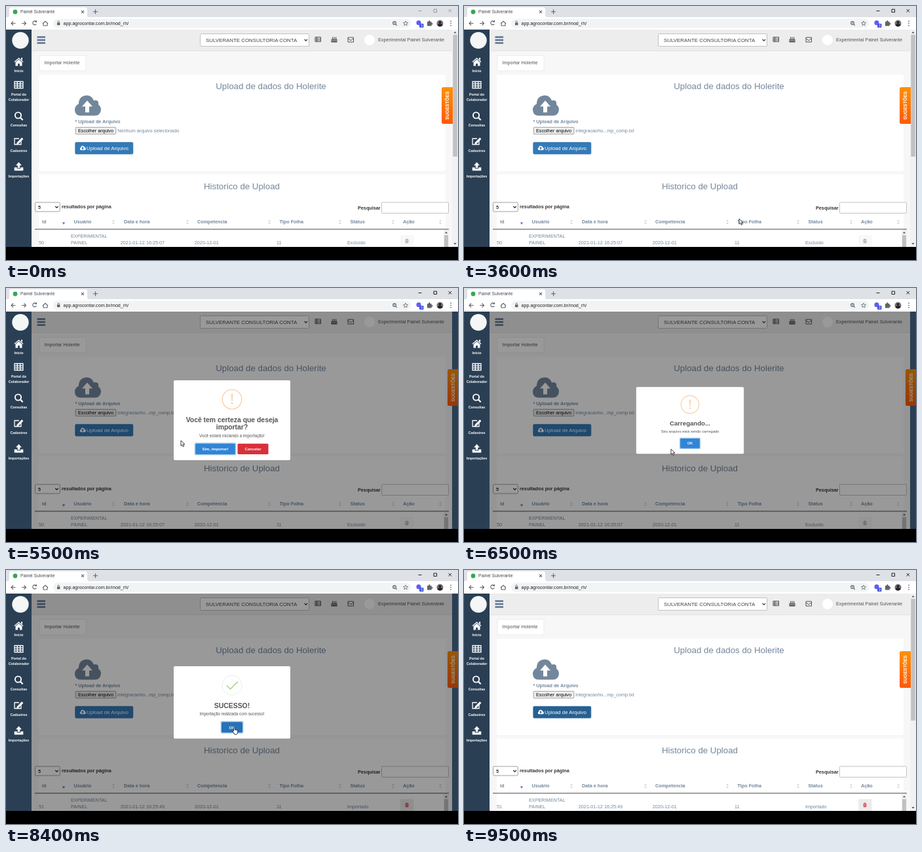
An HTML page for the animation above (9.6 s loop, 690 px wide and 388 px high).

```html
<!DOCTYPE html>
<html lang="pt-BR">
<head>
<meta charset="utf-8">
<style>
html, body { margin: 0; width: 100%; height: 100%; overflow: hidden; background: #000 }
svg { display: block; width: 690px; height: 388px }
text { font: 7.25px "Liberation Sans", Arial, sans-serif; fill: #73879c; white-space: pre }
.b { font-weight: bold }
.k { fill: #333 }
.w { fill: #fff }
.c { text-anchor: middle }
.h { font-size: 13.3px; text-anchor: middle }
.nav { font-size: 5.3px; font-weight: bold; fill: #fff; text-anchor: middle }
.title { font-size: 10.4px; font-weight: bold; fill: #545454; text-anchor: middle }
.sub { font-size: 6.3px; fill: #545454; text-anchor: middle }
.btn { font-size: 5.9px; font-weight: bold; fill: #fff; text-anchor: middle }
.line { fill: none; stroke: #5f6368; stroke-width: 1.1 }
.box { fill: #fff; stroke: #8a8a8a; stroke-width: .8 }
.field { fill: #fff; stroke: #b4b4b4; stroke-width: .8 }
</style>
</head>
<body>
<svg viewBox="0 0 690 388">
<defs>
  <linearGradient id="orange" x2="0" y2="1"><stop stop-color="#ff9100"/><stop offset="1" stop-color="#ff5a00"/></linearGradient>
  <g id="cloud">
    <path d="M9 31Q0 31 0 22Q0 16 6 13Q6 1 18 0Q26 0 29 8Q37 6 36 14Q40 17 40 22Q39 31 31 31Z"/>
    <path fill="#fff" d="M19 8L27 17H22V26H16V17H11Z"/>
  </g>
  <g id="trash" fill="none" stroke-width=".9">
    <path d="M609.5 357.2h5M611 357v-1h2v1M610.1 357.5v4.3h3.8v-4.3M611.4 358.5v2.5M612.6 358.5v2.5"/>
  </g>
  <g id="ok">
    <rect x="327.5" y="230.8" width="35" height="19" rx="2" fill="#a9cbed"/>
    <rect x="329" y="232.3" width="32" height="16" rx="1.5"/>
    <text class="btn" x="345" y="242.5">OK</text>
  </g>
  <g id="alert">
    <circle cx="345" cy="0" r="14.8" fill="none" stroke="#facea8" stroke-width="1.3"/>
    <path d="M344.2 -8h1.7l-.4 11h-.9zM344.2 5h1.7v2h-1.7z" fill="#f8bb86"/>
  </g>
</defs>

<!-- Browser -->
<rect width="690" height="18" fill="#dee1e6"/>
<path d="M2 18Q5 17 5 13V5Q5 2 8 2H121Q124 2 124 5V13Q124 17 127 18Z" fill="#fff"/>
<circle cx="14" cy="9" r="3.4" fill="#34a853"/>
<text x="22" y="11.3" style="font-size:6.7px;fill:#45494d">Painel Sulverante</text>
<path class="line" d="M115 6.8l4 4m0-4l-4 4M133 8.7h7M136.5 5.2v7"/>
<path id="win" fill="none" d="M629.5 7.5h5M653 5h4.5v4.5H653zM675.5 5l4.5 4.5m0-4.5l-4.5 4.5"/>
<rect y="17" width="690" height="19" fill="#fff"/>
<path class="line" d="M14.5 26.5H8m3-3l-3 3 3 3M46 23.8a3 3 0 1 0 .4 3.6M46.5 22v2.3h-2.3M56 27l4-3.7 4 3.7M57 26.5v3.5h6v-3.5"/>
<path class="line" d="M24 26.5h6.5m-3-3l3 3-3 3"/>
<rect x="72" y="19.5" width="546" height="14" rx="7" fill="#f1f3f4"/>
<rect x="78" y="25.5" width="4.4" height="3.7" fill="#5f6368"/>
<path class="line" style="stroke-width:.8" d="M79 25.5v-1.3a1.2 1.2 0 0 1 2.4 0v1.3"/>
<text x="87.5" y="29" style="font-size:7.15px;fill:#202124">app.agrocontar.com.br/mod_rh/</text>
<circle class="line" cx="593" cy="26" r="2.4"/><path class="line" d="M594.8 27.8l2 2M592 26h2"/>
<path class="line" style="stroke-width:.8" d="M610 23l1 2.3 2.5.2-1.9 1.6.6 2.5-2.2-1.3-2.2 1.3.6-2.5-1.9-1.6 2.5-.2z"/>
<circle cx="630" cy="25.7" r="3.6" fill="#625df5"/>
<rect x="631" y="27" width="6.5" height="6" rx="1" fill="#4257d8"/><text class="w c" x="634.3" y="32" style="font-size:5px">3</text>
<path fill="#5f6368" d="M643 24h2q0-2 1.3-2t1.3 2h2v2q2 0 2 1.3t-2 1.3v1.9h-6.6z"/>
<circle cx="662.5" cy="26.5" r="5" fill="#7d6f72"/>
<path d="M658.5 29.5Q659 27 662.5 27T666.5 29.5Q665 31.5 662.5 31.5T658.5 29.5" fill="#24242c"/><circle cx="662.5" cy="25" r="2" fill="#24242c"/>
<path fill="#5f6368" d="M678.3 22.5h1.5v1.5h-1.5zM678.3 25.8h1.5v1.5h-1.5zM678.3 29h1.5v1.5h-1.5z"/>

<!-- Page -->
<rect y="36" width="690" height="332" fill="#2a3f54"/>
<rect x="39" y="36" width="642" height="332" fill="#f7f7f7"/>
<rect x="39" y="36" width="642" height="32" fill="#ededed"/>
<path d="M39 68.4h642" stroke="#d9dee4" stroke-width=".8"/>
<path d="M47.5 47.5h12.5M47.5 52h12.5M47.5 56.5h12.5" stroke="#5a738e" stroke-width="2.3"/>
<rect class="field" x="296.5" y="42.5" width="166" height="19" rx="1"/>
<text x="305" y="54.7" style="font-size:7.9px;fill:#444">SULVERANTE CONSULTORIA CONTA</text>
<path d="M455.5 50.8l2.3 2.3 2.3-2.3" fill="none" stroke="#333" stroke-width="1.2"/>
<path d="M472 47.5h8.5v7H472zM472 50h8.5M472 52.3h8.5M474.5 47.5v7" fill="none" stroke="#515356" stroke-width="1"/>
<path d="M496.5 55.5v-4.8h9v4.8zM498 50.5v-3h1.2v3zM500.5 50.5v-3h1.2v3zM503 50.5v-3h1.2v3z" fill="#515356"/>
<path d="M497 52.5q1 1.3 2 0 1 1.3 2 0 1 1.3 2 0 1 1.3 2 0" fill="none" stroke="#ededed" stroke-width=".7"/>
<path d="M522 48h8.5v7H522zM522 49.7l4.2 3 4.2-3" fill="none" stroke="#515356"/>
<circle cx="555" cy="52" r="8" fill="#fff"/>
<text x="568" y="54.3" style="fill:#515356">Experimental Painel Sulverante</text>

<path d="M51 99V75.5h71V99z" fill="#fff" stroke="#e6e9ed" stroke-width=".8"/>
<text x="58.5" y="89.3" style="fill:#555">Importar Holerite</text>
<path d="M50 105h621v147H50zM50 257.5h621V368H50z" fill="#fff"/>
<text class="h" x="404.5" y="127">Upload de dados do Holerite</text>
<use href="#cloud" fill="#73879c" transform="translate(105 136.5)"/>
<text class="b" x="105.5" y="178.8">* Upload de Arquivo</text>
<rect id="pick" class="box" x="106.2" y="185.3" width="61.6" height="10.4" rx="1"/>
<text x="110" y="193" style="fill:#000">Escolher arquivo</text>
<text id="file" x="170.3" y="193"></text>
<rect id="send" x="105.8" y="208.3" width="88" height="17.8" rx="1.5" stroke="#2e6da4" stroke-width=".8"/>
<path fill="#fff" d="M115 220.3q-2.2 0-2.2-2 0-1.4 1.4-2 .1-2.8 2.8-2.9 1.9 0 2.5 1.8 1.7-.1 1.6 1.6.8.5.8 1.5 0 2-2 2z"/>
<path fill="#337ab7" d="M117 215l2 2.2h-1.2v2h-1.6v-2H115z"/>
<text class="w" x="123" y="220" style="font-size:7.8px">Upload de Arquivo</text>

<text class="h" x="360" y="280">Historico de Upload</text>
<rect class="box" x="44.5" y="300" width="37.8" height="14" rx="1.5"/>
<text class="b k" x="49" y="309.5">5</text>
<path d="M75.3 306l2.2 2.2 2.2-2.2" fill="none" stroke="#222" stroke-width="1.2"/>
<text class="b k" x="85" y="309.3">resultados por página</text>
<text class="b k" x="537" y="310.8">Pesquisar</text>
<rect class="field" x="573.5" y="300" width="102" height="16.5" rx="1"/>
<path d="M44 341h632" stroke="#333" stroke-width=".9"/>
<g id="heads"></g>
<text id="rowId" x="50" y="363.7"></text>
<text x="99" y="353.8">EXPERIMENTAL</text><text x="99" y="363.7">PAINEL</text>
<text id="rowTime" x="174.8" y="363.7"></text>
<text x="287.8" y="363.7">2020-12-01</text><text x="413" y="363.7">11</text>
<text id="rowState" x="521" y="363.7"></text>
<rect id="del" x="602" y="350" width="20.5" height="18" rx="1.5"/>
<use id="bin" href="#trash"/>
<rect x="668" y="342" width="8" height="26" fill="#f1f1f1"/>
<path d="M669.8 347.3l2.2-2.6 2.2 2.6z" fill="#555"/><rect x="669" y="350" width="6" height="18" fill="#c1c1c1"/>

<g id="bar">
  <rect x="681" y="36" width="9" height="332" fill="#f1f1f1"/>
  <rect x="682.3" y="44" width="6.6" height="186" fill="#c1c1c1"/>
  <path d="M683.3 41.5l2.2-2.6 2.2 2.6zM683.3 362l2.2 2.6 2.2-2.6z" fill="#555"/>
</g>
<g id="tips">
  <path d="M682 124h-14.5q-2.5 0-2.5 2.5v51q0 2.5 2.5 2.5H682z" fill="url(#orange)"/>
  <text class="b w c" transform="translate(676 152) rotate(-90)" style="font-size:7px">SUGESTÕES</text>
</g>
<path id="shade" d="M39 36h642v88h9v56h-9v188H39z"/>

<!-- Sidebar -->
<circle cx="22" cy="52.5" r="12.7" fill="#f4f7f5"/>
<g fill="#fff">
  <path d="M19.5 79l7 6-.8 1-6.2-5.3-6.2 5.3-.8-1zM14.5 86l5-4.3 5 4.3v5.5h-3.6v-3.6h-2.8v3.6h-3.6zM23 79h2v4l-2-1.8z"/>
  <path d="M16 211.5l1-3.2 7.2-7.2 2.2 2.2-7.2 7.2z"/>
  <path d="M19.5 238.5l4.5 5h-2.8v4h-3.4v-4H15zM12.7 246.5h4v2h5.6v-2h4v5H12.7z"/>
</g>
<path d="M13 115.5h13v10H13zM13 118.8h13M13 122.2h13M17.3 115.5v10M21.7 115.5v10M23 205v6.5H13v-9h7" fill="none" stroke="#fff" stroke-width="1.3"/>
<circle cx="18.5" cy="167" r="4.6" fill="none" stroke="#fff" stroke-width="1.9"/><path d="M22 170.5l3.6 3.8" stroke="#fff" stroke-width="2.3"/>
<text class="nav" x="19.5" y="101">Início</text>
<text class="nav" x="19.5" y="136.8">Portal do</text><text class="nav" x="19.5" y="144.8">Colaborador</text>
<text class="nav" x="19.5" y="183.8">Consultas</text>
<text class="nav" x="19.5" y="222.6">Cadastros</text>
<text class="nav" x="19.5" y="261.8">Importações</text>

<!-- Dialogs -->
<g id="ask">
  <rect x="256" y="141" width="178" height="122" rx="2" fill="#fff"/>
  <use href="#alert" y="170"/>
  <text class="title" x="345" y="205">Você tem certeza que deseja</text><text class="title" x="345" y="216.3">importar?</text>
  <text class="sub" x="345" y="227.8">Você estará iniciando a importação!</text>
  <rect x="287.7" y="236.3" width="63.6" height="19.2" rx="2" fill="#a9cbed"/>
  <rect x="289.2" y="237.8" width="60.6" height="16.2" rx="1.5" fill="#3085d6"/>
  <rect x="353.5" y="237.8" width="47" height="16.2" rx="1.5" fill="#d9303a"/>
  <text class="btn" x="319.5" y="248">Sim, importar!</text><text class="btn" x="377" y="248">Cancelar</text>
</g>
<g id="load">
  <rect x="256" y="147" width="178" height="110.5" rx="2" fill="#fff"/>
  <use href="#alert" y="176"/>
  <text class="title" x="345" y="210.6">Carregando...</text>
  <text class="sub" x="345" y="222.3">Seu arquivo está sendo carregado</text>
  <use href="#ok" fill="#3085d6"/>
</g>
<g id="done">
  <rect x="256" y="147" width="178" height="110.5" rx="2" fill="#fff"/>
  <circle cx="345" cy="176" r="15" fill="none" stroke="#edf7e8" stroke-width="1.4"/>
  <path id="tick" d="M337 176.5l5.5 5.3 11.5-11.3" pathLength="1" stroke-dasharray="1 2" fill="none" stroke="#a5dc86" stroke-width="1.7"/>
  <text class="title" x="345" y="210.6">SUCESSO!</text>
  <text class="sub" x="345" y="222.3">Importação realizada com sucesso!</text>
  <use id="okDone" href="#ok"/>
</g>

<g id="mouse" stroke="#111" stroke-width=".8" fill="#fff" stroke-linejoin="round">
  <path id="arrow" d="M0 0v8.2l1.9-1.7 1.4 3 1.4-.7-1.3-2.9h2.6z"/>
  <path id="hand" d="M-1 1q0-1 .9-1t.9 1v3.2q1-.6 1.5.2 1-.5 1.5.3 1.4-.3 1.4 1v2.2q0 2.3-1.5 3.3H.3Q-.5 8.5-2.8 6.3q0-1.2 1.8-.2z"/>
</g>
<rect y="368" width="690" height="20"/>
</svg>
<script>
const LOOP = 9600, ASK = 5150, LOAD = 6415, DONE = 7500, CLOSE = 8750;
const el = id => document.getElementById(id);
const set = (id, attr, value) => el(id).setAttribute(attr, value);
const show = (id, on) => set(id, 'visibility', on ? 'visible' : 'hidden');
const clamp = v => Math.max(0, Math.min(1, v));

const heads = [['id', 55, 88], ['Usuário', 103.5, 164], ['Data e hora', 180, 277], ['Competencia', 292, 402],
  ['Tipo Folha', 417.5, 510], ['Status', 525.5, 591], ['Ação', 606, 663]];
el('heads').innerHTML = heads.map(([name, x, arrow], i) =>
  `<text class="b" x="${x}" y="332.3">${name}</text>` + (i
    ? `<path d="M${arrow - 2} 329.2l2-2.8 2 2.8zM${arrow - 2} 331l2 2.8 2-2.8z" fill="#d3d6dc"/>`
    : `<path d="M${arrow - 2.2} 330.5h4.4l-2.2 3.6z" fill="#6670c8"/>`)).join('');

// Value between [time, ...values] stops, with optional easing.
function track(stops, t, ease = u => u) {
  const i = stops.findIndex(s => s[0] > t);
  if (i < 0) return stops.at(-1).slice(1);
  if (!i) return stops[0].slice(1);
  const a = stops[i - 1], b = stops[i], u = ease((t - a[0]) / (b[0] - a[0]));
  return a.slice(1).map((v, k) => v + (b[k + 1] - v) * u);
}
const smooth = u => u * u * (3 - 2 * u);
const pop = [[0, .7], [135, 1.05], [240, .95], [300, 1]];
const path = [[3600, 420, 325], [4400, 163, 214], [5100, 163, 214], [5500, 267, 233], [5900, 316, 246],
  [7500, 316, 246], [8100, 348.5, 240]];

function dialog(id, t, from, to) {
  show(id, t >= from && t < to);
  const s = track(pop, t - from)[0];
  set(id, 'transform', `translate(345 202) scale(${s}) translate(-345 -202)`);
}

function draw(t) {
  const within = (a, b) => t >= a && t < b;
  const chosen = t >= 3600, fresh = t >= DONE, modal = within(ASK, CLOSE);
  set('win', 'stroke', chosen ? '#222' : '#999');
  set('pick', 'style', `fill:${within(1000, 3600) ? '#dedede' : '#efefef'}`);
  el('file').textContent = chosen ? 'integracaoho...mp_comp.txt' : 'Nenhum arquivo selecionado';
  set('send', 'fill', within(4900, ASK) ? '#204d74' : within(4300, 4900) || t >= CLOSE ? '#286090' : '#337ab7');

  el('rowId').textContent = fresh ? 51 : 50;
  el('rowTime').textContent = '2021-01-12 16:25:' + (fresh ? '49' : '07');
  el('rowState').textContent = fresh ? 'Importado' : 'Excluído';
  set('del', 'fill', fresh ? '#ececec' : '#f8f8f8');
  set('bin', 'stroke', fresh ? '#e02b35' : '#a5a5a5');

  show('bar', !modal);
  set('tips', 'transform', `translate(${modal ? 9 : 0} 0)`);
  set('shade', 'opacity', modal ? .4 * clamp((t - ASK) / 100) : 0);
  dialog('ask', t, ASK, LOAD);
  dialog('load', t, LOAD, DONE);
  dialog('done', t, DONE, CLOSE);
  set('tick', 'stroke-dashoffset', 1 - clamp((t - DONE) / 500));
  set('okDone', 'fill', t > 8000 ? '#2672b8' : '#3085d6');

  const hand = within(4300, ASK) || within(5800, LOAD) || within(8000, CLOSE), seen = within(3600, CLOSE);
  set('mouse', 'transform', `translate(${track(path, t, smooth)})`);
  show('arrow', seen && !hand);
  show('hand', seen && hand);
}

const start = performance.now();
function frame() {
  draw((performance.now() - start) % LOOP);
  requestAnimationFrame(frame);
}
frame();
</script>
</body>
</html>
```
